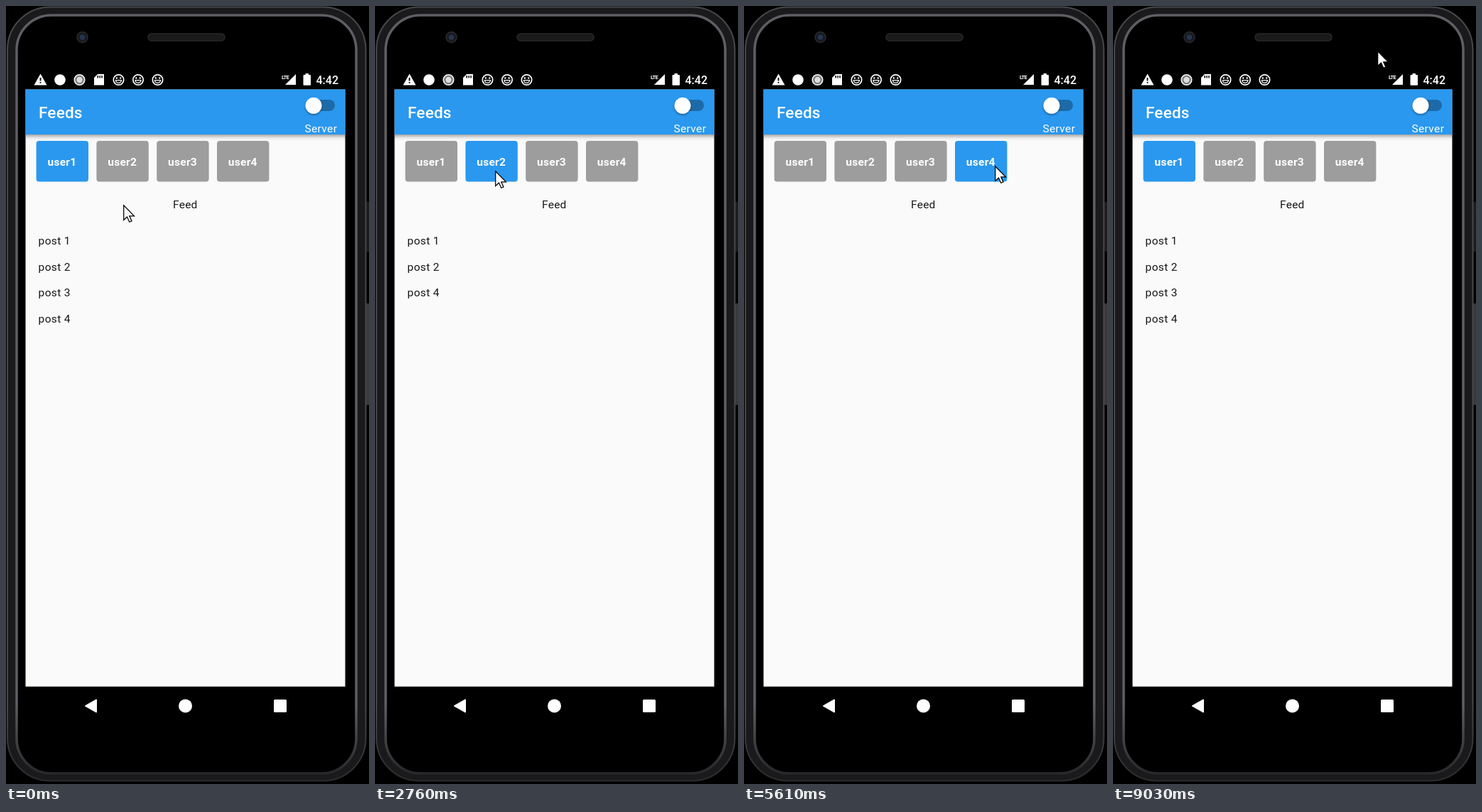
An HTML page with a canvas for the animation above (9090 ms loop, 511 by 1096 pixels).

```html
<!DOCTYPE html>
<html lang="en">
<head>
<meta charset="utf-8">
<title>Feeds</title>
<style>
html, body { margin: 0; width: 100%; height: 100%; overflow: hidden; background: #000; }
canvas { display: block; width: 511px; height: 1096px; }
</style>
</head>
<body>
<canvas id="stage" width="511" height="1096"></canvas>
<script>
const ctx = document.getElementById('stage').getContext('2d');
const LOOP = 9090;
const BLUE = '#2a98ee';
const INK = '#161616';
const FONT = 'Roboto, "Noto Sans", sans-serif';
const BODY = 15.5;
const SCREEN = { x: 27.5, y: 117.5, w: 450, h: 841.3 };

// Posts that each user sees
const feeds = ['1234', '124', '134', ''];

// Pointer glides; a glide with a user ends in a click on that user's button
const glides = [
  { from: 580, to: 1450, x: 155, y: 238 },
  { from: 1520, to: 1880, x: 169, y: 232, user: 2 },
  { from: 3060, to: 3560, x: 267, y: 229, user: 3 },
  { from: 4000, to: 4600, x: 353, y: 225, user: 4 },
  { from: 5850, to: 6800, x: 86, y: 227, user: 1 },
  { from: 6900, to: 7330, x: 184, y: 186 },
  { from: 7730, to: 9030, x: 372, y: 63 }
];

function stateAt(t) {
  const state = { x: 165, y: 280, user: 1 };
  for (const g of glides) {
    if (t < g.from) break;
    const k = Math.min(1, (t - g.from) / (g.to - g.from));
    const ease = k * k * (3 - 2 * k);
    const dx = g.x - state.x, dy = g.y - state.y;
    const sag = 0.15 * Math.abs(dx) * Math.sin(Math.PI * ease);
    state.x += dx * ease;
    state.y += dy * ease + sag;
    if (k === 1 && g.user) state.user = g.user;
  }
  return state;
}

function paint(fill, stroke, width) {
  if (fill) { ctx.fillStyle = fill; ctx.fill(); }
  if (stroke) { ctx.strokeStyle = stroke; ctx.lineWidth = width; ctx.stroke(); }
}

function box(x, y, w, h, r, fill, stroke, width = 1) {
  ctx.beginPath();
  ctx.roundRect(x, y, w, h, r);
  paint(fill, stroke, width);
}

function disc(x, y, r, fill, stroke, width = 1) {
  ctx.beginPath();
  ctx.arc(x, y, r, 0, Math.PI * 2);
  paint(fill, stroke, width);
}

function shape(d, fill, stroke, width = 1) {
  const p = new Path2D(d);
  ctx.fillStyle = fill;
  ctx.fill(p);
  if (stroke) { ctx.strokeStyle = stroke; ctx.lineWidth = width; ctx.stroke(p); }
}

function text(str, x, y, size, color, weight = 400, align = 'left', spacing = 0.27) {
  ctx.font = `${weight} ${size}px ${FONT}`;
  ctx.letterSpacing = spacing + 'px';
  ctx.textAlign = align;
  ctx.fillStyle = color;
  ctx.fillText(str, x, y);
}

function shadow(alpha, blur, dy) {
  ctx.shadowColor = `rgba(0,0,0,${alpha})`;
  ctx.shadowBlur = blur;
  ctx.shadowOffsetY = dy;
}

function fade(top, bottom) {
  const g = ctx.createLinearGradient(0, 0, 0, 1092);
  g.addColorStop(0, top);
  g.addColorStop(0.9, top);
  g.addColorStop(1, bottom);
  return g;
}

function drawPhone() {
  ctx.fillStyle = '#000';
  ctx.fillRect(0, 0, 511, 1096);
  box(506, 276, 6, 70, 2, '#1c1c1e');
  box(506, 419, 6, 143, 2, '#3a3a3c');

  box(2, 1.5, 504.5, 1090, 60, '#1a1a1c', fade('#47474a', '#2b2b2d'), 2);
  box(15, 13, 478, 1068, 49, '#000', fade('#5e5e64', '#222224'), 3.5);

  box(200, 39, 108, 10, 5, '#1a1a1a', '#292929', 1.5);
  disc(107.5, 44, 7.5, '#17191e', '#292b2f', 1.5);
  disc(107.5, 44, 3.8, '#25344f');
}

function drawFace(x) {
  disc(x, 104, 7.2, null, '#fff', 1.7);
  for (const side of [-1, 1]) disc(x + side * 2.7, 101.5, 1.2, '#fff');
  ctx.beginPath();
  ctx.arc(x, 104.3, 4.1, 0.1, Math.PI - 0.1);
  ctx.closePath();
  paint(null, '#fff', 1.2);
}

function drawStatus() {
  shape('M48.5 95.5l9 16h-18z', '#fff');
  box(47.6, 101, 1.8, 4.5, 0, '#000');
  box(47.6, 107, 1.8, 1.8, 0, '#000');

  disc(76, 104, 7.8, '#fff');
  disc(103.5, 104, 7.2, '#777', '#eee', 1.8);
  disc(103.5, 104, 4.2, '#ddd');

  shape('M129 96h9v15.5h-14V101z', '#fff');
  for (let i = 0; i < 3; i++) box(128.5 + i * 2.9, 98, 1.5, 3.5, 0, '#000');
  for (let i = 0; i < 3; i++) drawFace(158.5 + i * 27.5);

  shape('M408 96v15h-15z', '#fff');
  box(386, 94, 14, 10.5, 0, '#000');
  text('LTE', 388, 102.7, 7.5, '#fff', 700, 'left', -0.7);
  box(421.5, 95, 4.5, 4, 0.5, '#fff');
  box(418.5, 97, 10.5, 14.8, 1, '#fff');
  text('4:42', 436.5, 110, 16, '#fff', 500, 'left', 0);
}

function drawScreen() {
  const { x, y, w, h } = SCREEN;
  box(x, y, w, h, 0, '#fafafa');
  ctx.save();
  ctx.beginPath();
  ctx.rect(x, y, w, h);
  ctx.clip();
  shadow(0.45, 6, 2);
  box(x - 6, y - 6, w + 12, 69.5, 0, BLUE);
  ctx.restore();

  text('Feeds', 46, 158, 22.6, '#fff', 500, 'left', 0.16);
  box(426, 132, 37, 16, 8, '#1d6aa8');
  ctx.save();
  shadow(0.4, 3, 1.5);
  disc(433, 140.3, 11.5, '#fff');
  ctx.restore();
  text('Server', 420.5, 178, BODY, '#fff', 400, 'left', 0.35);
}

function drawFeed(user) {
  for (let i = 0; i < 4; i++) {
    const x = 42.6 + i * 84.8;
    box(x, 190, 73.4, 57.6, 4, i + 1 === user ? BLUE : '#9d9d9d');
    text('user' + (i + 1), x + 36.3, 225, BODY, '#fff', 700, 'center');
  }
  text('Feed', 252.3, 285.3, BODY, INK, 400, 'center');
  [...feeds[user - 1]].forEach((n, i) =>
    text('post ' + n, 45.6, 336 + i * 36.6, BODY, INK, 400, 'left', 0.35));
}

function drawNav() {
  ctx.lineJoin = 'round';
  shape('M112 986l15-8.5v17z', '#fff', '#fff', 2);
  ctx.lineJoin = 'miter';
  disc(252.5, 986, 9.5, '#fff');
  box(377, 977, 18, 18, 1.5, '#fff');
}

function drawPointer({ x, y }) {
  ctx.save();
  ctx.translate(x + 0.7, y + 0.8);
  ctx.scale(1.25, 1.25);
  shape('M0 0v16.6l3.8-3.6 2.6 5.8 2.6-1.1-2.5-5.7h5.3z', '#fff', '#000');
  ctx.restore();
}

const start = performance.now();
function tick() {
  const state = stateAt((performance.now() - start) % LOOP);
  drawPhone();
  drawStatus();
  drawScreen();
  drawFeed(state.user);
  drawNav();
  drawPointer(state);
  requestAnimationFrame(tick);
}
tick();
</script>
</body>
</html>
```
